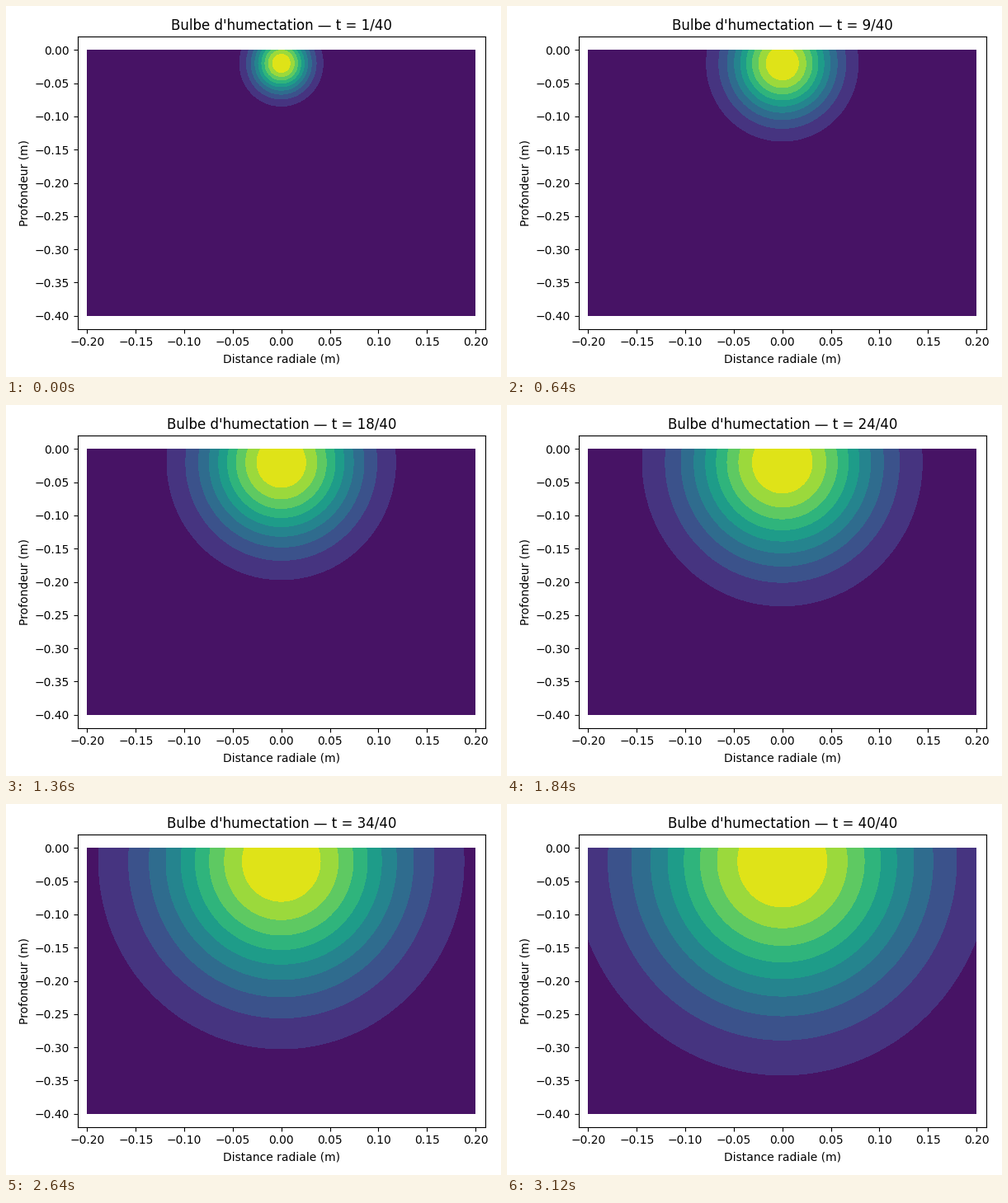
Write a matplotlib script that moves like this. It is 600 px wide and 450 px high and loops after 3200 ms.

```python
import numpy as np
import matplotlib.pyplot as plt
from matplotlib.animation import FuncAnimation

STEPS = 40
SOURCE_DEPTH = 0.02
LEVELS = np.linspace(0, 1, 11)

R, Z = np.meshgrid(np.linspace(-0.2, 0.2, 100), np.linspace(-0.4, 0, 100))


def moisture(step):
    """Gaussian wet bulb that widens linearly with time."""
    u = step / (STEPS - 1)
    sr = 0.02 + 0.08 * u
    sz = 0.03 + 0.12 * u
    return np.exp(-0.5 * ((R / sr) ** 2 + ((Z + SOURCE_DEPTH) / sz) ** 2))


fig, ax = plt.subplots(figsize=(6, 4.5), dpi=100)


def draw(step):
    ax.clear()
    ax.contourf(R, Z, moisture(step), levels=LEVELS, cmap="viridis")
    ax.set_xlim(-0.21, 0.21)
    ax.set_ylim(-0.42, 0.02)
    ax.set_xlabel("Distance radiale (m)")
    ax.set_ylabel("Profondeur (m)")
    ax.set_title(f"Bulbe d'humectation — t = {step + 1}/{STEPS}")
    return []


draw(0)
fig.tight_layout()
anim = FuncAnimation(fig, draw, frames=STEPS, interval=80,
                     init_func=lambda: draw(0), repeat=True, repeat_delay=0)
plt.show()
```
